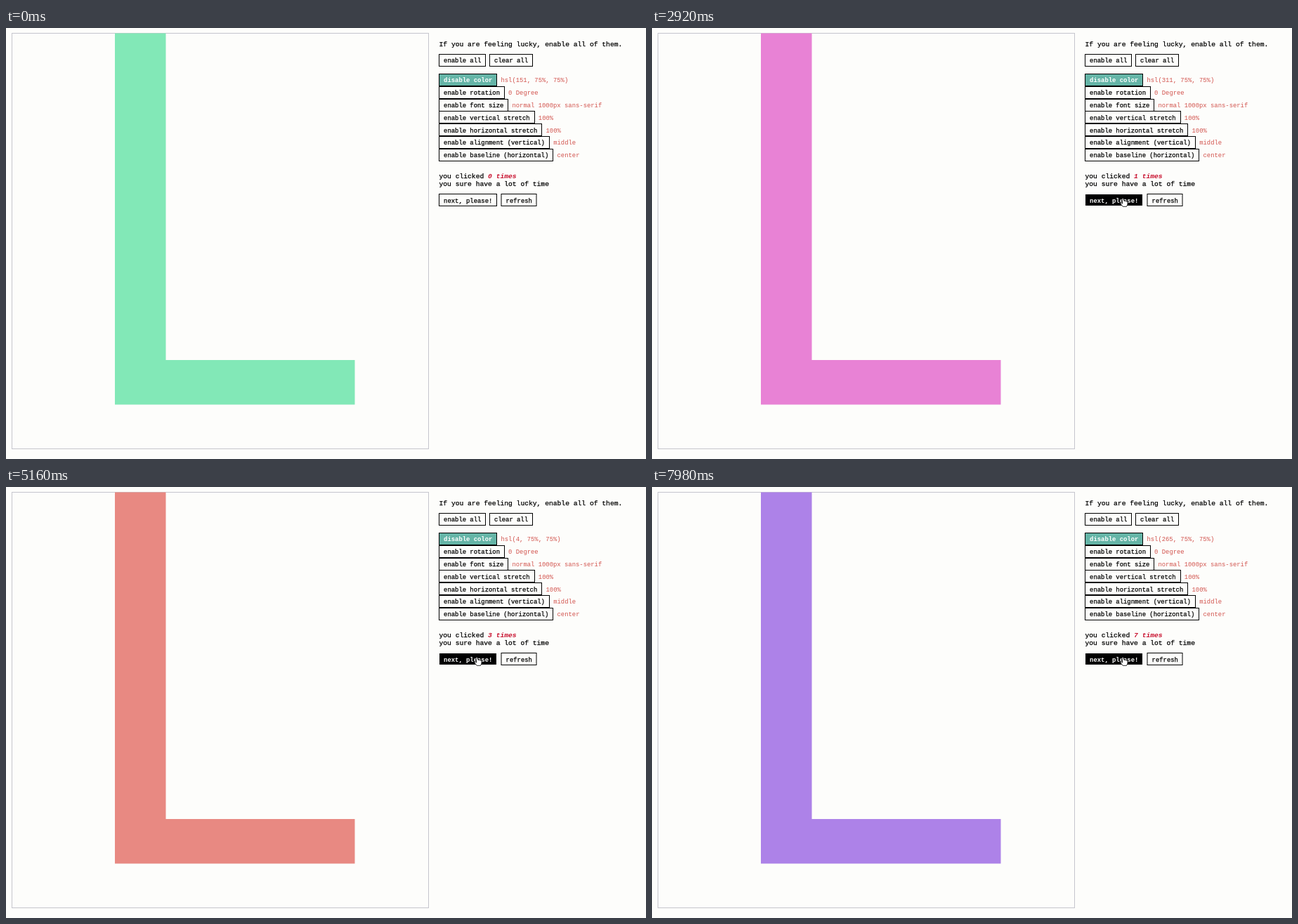
These frames come from a looping animation (911x614 px, 8 s). An HTML page:

```html
<!DOCTYPE html>
<html lang="en">
<head>
<meta charset="utf-8">
<title>Letter generator</title>
<style>
  html, body { margin: 0; width: 100%; height: 100%; overflow: hidden; background: #fdfdfb; }
  svg { display: block; width: 911px; height: 614px; }
  text { font: 8.9px "Liberation Mono", monospace; fill: #000; stroke: #000; stroke-width: .25px; white-space: pre; }
  .copy { font-size: 9.66px; }
  .value { fill: #d2544e; stroke: none; }
  .count { font-weight: bold; font-style: italic; fill: #c8102e; stroke: none; }
  .button rect { fill: #fdfdfb; stroke: #000; }
  .button.on rect { fill: #65b5a7; }
  .button.hover rect { fill: #000; stroke: #fdfdfb; }
  .button.on text, .button.hover text { fill: #fff; stroke: none; font-weight: bold; }
</style>
</head>
<body>
<svg id="stage" viewBox="0 0 911 614">
  <rect x="8.5" y="7.5" width="593" height="592" fill="none" stroke="#c5c5cd"/>
  <path id="letter" d="M155 7.5H227.5V473H496.5V536.5H155Z"/>
  <g id="panel"></g>
  <g id="ring" fill="none">
    <circle cx="670" cy="242" r="21" stroke="#fff" stroke-width="4.4"/>
    <circle cx="670" cy="242" r="21" stroke="#000" stroke-width="2.8"/>
  </g>
  <path id="arrow" d="M0 0V10.5L2.4 8.3L4.2 12.2L6 11.4L4.3 7.6H7.5Z"
        fill="#000" stroke="#fff" stroke-width=".7"/>
  <path id="hand" d="M-1 1Q0-.4 1 1L2.1 4.6L3.2 4.2L4.4 5L5.6 4.8L7 6.2V9.2L5.6 12.4H.2L-3 8.4Q-3.4 6.8-2 7L-.2 8Z"
        fill="#fff" stroke="#000" stroke-width=".8"/>
</svg>
<script>
const DURATION = 8000, LEFT = 616.5, CHAR = 5.34, ROW = 17.8;
const $ = id => document.getElementById(id);
const panel = $('panel');

function add(tag, attrs, parent = panel, content = '') {
  const node = document.createElementNS('http://www.w3.org/2000/svg', tag);
  for (const key in attrs) node.setAttribute(key, attrs[key]);
  node.textContent = content;
  return parent.appendChild(node);
}
const write = (x, y, content, kind) => add('text', { x, y, class: kind }, panel, content);

function button(x, y, label, { state = '', baseline = y + 11.6 } = {}) {
  const group = add('g', { class: 'button ' + state });
  const width = label.length * CHAR + 13.4;
  add('rect', { x, y, width: Math.floor(width), height: 17 }, group);
  add('text', { x: x + 6.6, y: baseline }, group, label);
  return { group, right: x + width };
}

write(LEFT, 25.6, 'If you are feeling lucky, enable all of them.', 'copy');
button(LEFT, 37.5, 'enable all');
button(688.5, 37.5, 'clear all');

const values = [
  ['disable color', ''],
  ['enable rotation', '0 Degree'],
  ['enable font size', 'normal 1000px sans-serif'],
  ['enable vertical stretch', '100%'],
  ['enable horizontal stretch', '100%'],
  ['enable alignment (vertical)', 'middle'],
  ['enable baseline (horizontal)', 'center']
].map(([label, value], i) => {
  const y = Math.round(65 + ROW * i) + 0.5;
  const baseline = 77.4 + ROW * i;
  const { right } = button(LEFT, y, label, { state: i ? '' : 'on', baseline });
  return write(right + 5.1, baseline, value, 'value');
});

write(LEFT, 214.2, 'you clicked ', 'copy');
const count = write(LEFT + 12 * 5.8, 214.2, '', 'copy count');
write(LEFT, 225.2, 'you sure have a lot of time', 'copy');
const next = button(LEFT, 236.5, 'next, please!', { baseline: 248.6 }).group;
button(705, 236.5, 'refresh', { baseline: 248.6 });

const clicks = [2560, 4040, 4760, 5480, 6200, 6920, 7640];
const hues = [151, 311, 338, 4, 59, 114, 190, 265];
// time, x, y of the pointer
const route = [[0, 925, 420], [820, 701.5, 238.5], [1060, 709, 235], [1500, 670, 242]];

function pointer(t) {
  const i = route.findIndex(stop => stop[0] > t);
  if (i < 0) return route.at(-1).slice(1);
  const [a, b] = [route[i - 1], route[i]];
  const p = (t - a[0]) / (b[0] - a[0]);
  const ease = p * p * (3 - 2 * p);
  return [1, 2].map(k => a[k] + (b[k] - a[k]) * ease);
}

// Pictures are held for 20, 20 and 100 ms in turn.
function hold(t) {
  const phase = (t + 20) % 140;
  return Math.max(0, t - phase + (phase < 20 ? 0 : phase < 40 ? 20 : 40));
}

const show = (node, visible) => node.style.display = visible ? '' : 'none';

function render(time) {
  const t = hold(time);
  const done = clicks.filter(c => c <= t).length;
  const [x, y] = pointer(t);
  const over = x < 699 && y > 237;

  $('letter').style.fill = `hsl(${hues[done]}, 69%, 71%)`;
  values[0].textContent = `hsl(${hues[done]}, 75%, 75%)`;
  count.textContent = `${done} times`;
  next.classList.toggle('hover', over);
  show($('ring'), clicks.some(c => t >= c - 160 && t < c + 40));
  show($('arrow'), !over);
  show($('hand'), over);
  for (const id of ['arrow', 'hand']) $(id).setAttribute('transform', `translate(${x} ${y})`);
}

const start = performance.now();
function tick() {
  render((performance.now() - start) % DURATION);
  requestAnimationFrame(tick);
}
tick();
</script>
</body>
</html>
```
